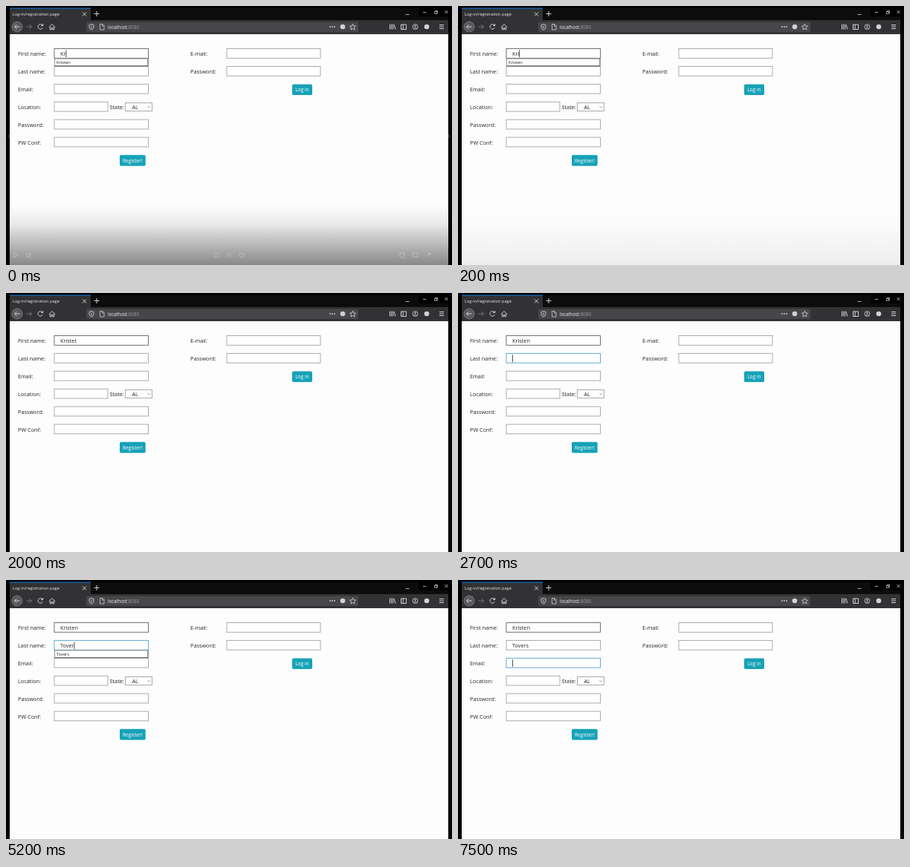
Animation of 600 by 349 pixels, one loop 8000 ms. Source, as an HTML page:

```html
<!DOCTYPE html>
<html lang="en">
<head>
<meta charset="utf-8">
<title>Log-in/registration page</title>
<style>
  html, body { margin: 0; width: 100%; height: 100%; overflow: hidden; background: #000; }
  svg { display: block; width: 600px; height: 349px; }
  text { font-family: "Open Sans", "Noto Sans", sans-serif; font-size: 7.3px; fill: #212529; white-space: pre; }
  .small { font-size: 5.7px; }
  .icon { fill: none; stroke: #d2d2d4; stroke-width: 1; }
  .dim { stroke: #77777a; }
  .field { fill: #fff; stroke: #a2a2a2; stroke-width: .9; }
  .field.edited { stroke: #606060; }
  .field.focus { stroke: #4fa3d1; }
  .button { fill: #17a2b8; }
  .button + text { fill: #fff; font-size: 6.6px; text-anchor: middle; }
</style>
</head>
<body>
<svg viewBox="0 0 600 349">
  <defs>
    <linearGradient id="fade" x1="0" y1="0" x2="0" y2="1">
      <stop offset="0" stop-opacity="0"/>
      <stop offset=".3" stop-opacity=".07"/>
      <stop offset="1" stop-opacity=".46"/>
    </linearGradient>
  </defs>

  <!-- browser window -->
  <rect width="600" height="349" fill="#000"/>
  <rect x="5" y="3" width="590" height="17" fill="#0c0c0d"/>
  <rect x="555" y="2" width="45" height="12" fill="#000"/>
  <rect x="5" y="3" width="109" height="17" fill="#323234"/>
  <rect x="5" y="2.5" width="109" height="1.2" fill="#1470c8"/>
  <rect x="5" y="19" width="590" height="19" fill="#323234"/>
  <rect x="108" y="21.5" width="366" height="13.5" rx="1.5" fill="#474749"/>
  <rect x="5" y="38" width="590" height="311" fill="#fdfdfd"/>
  <text x="9" y="13" style="font-size:5.66px;fill:#f0f0f0">Log-in/registration page</text>
  <text x="137" y="30.6" style="font-size:6.24px;fill:#f4f4f4">localhost<tspan fill="#9b9b9d">:8080</tspan></text>

  <g class="icon">
    <path d="M103 8.5l5 5m0-5l-5 5M118.500 10.500h7m-3.500-3.500v7"/>
    <path d="M537.500 11.500h5M561 8.500h4M590.500 6l4 4m0-4l-4 4" stroke-width=".8"/>
    <path d="M576.500 7.500h3v3h-3zM577.500 7.500v-1h3v3h-1" stroke-width=".7"/>
    <circle cx="15" cy="28" r="7" fill="#59595c" stroke="#88888b" stroke-width=".7"/>
    <path d="M18.500 28h-7m3-3l-3 3l3 3"/>
    <path class="dim" d="M27.500 28h7m-3-3l3 3l-3 3"/>
    <path d="M49 26a3.300 3.300 0 1 0 .3 3.300M49.700 24v2.600h-2.600"/>
    <path d="M58 28.500l4-4l4 4M59.300 27.800v4h1.900v-2.500h1.600v2.500h1.900v-4"/>
    <path d="M115 24.500l3 1v2.500q0 3-3 4.200q-3-1.200-3-4.200v-2.500zM115 26.500v3.600" stroke-width=".9"/>
    <path d="M126.500 24.500h3.500l2 2v5.500h-5.500zM129.500 24.700v2.300h2.300" stroke-width=".8"/>
    <path d="M466.500 24.300l1.200 2.600l2.800.3l-2.100 1.900l.6 2.800l-2.500-1.400l-2.500 1.400l.6-2.800l-2.100-1.900l2.800-.3z" stroke-width=".9"/>
    <path d="M516.500 24.500v7M518.600 24.500v7M520.700 24.500v7M522 25l2 6.500"/>
    <path d="M531.500 25h7v6.500h-7zM534.200 25v6.500"/>
    <circle cx="550.500" cy="28" r="3.500" stroke-width=".8"/>
    <circle cx="550.500" cy="27" r=".9"/>
    <path d="M548.300 30.500q2.200-2 4.400 0M583 25.500h6m-6 2.500h6m-6 2.500h6"/>
  </g>
  <g fill="#d2d2d4">
    <circle cx="436" cy="28" r=".9"/><circle cx="439" cy="28" r=".9"/><circle cx="442" cy="28" r=".9"/>
    <circle cx="453" cy="28" r="3.300"/><circle cx="566" cy="28" r="3.300"/>
  </g>

  <g id="form"></g>
  <rect class="button" x="385" y="105.500" width="27" height="14.500" rx="1.800"/><text x="398.400" y="115.300">Log in</text>
  <rect class="button" x="153" y="200.800" width="34.700" height="14.700" rx="1.800"/><text x="170.400" y="210.800">Register!</text>
  <text x="139.500" y="138.700">State:</text>
  <rect class="field" x="160.500" y="130.500" width="36" height="11"/>
  <text x="169.500" y="138.700">AL</text>
  <path d="M190.300 135.200l1.800 1.800l1.800-1.800" fill="none" stroke="#777" stroke-width=".7"/>

  <text id="first" x="73" y="67.200"></text>
  <text id="last" x="73" y="91.100"></text>
  <text id="mail" x="73" y="115"></text>
  <g id="list">
    <rect id="listBox" x="65.500" y="71" width="125.500" height="9.800" stroke="#777" stroke-width=".8"/>
    <path d="M191 71v9.800h-125.500" fill="none" stroke="#555" stroke-width=".8"/>
    <text id="listText" class="small" x="68" y="77.900"></text>
  </g>
  <rect id="caret" width=".8" height="9.800" fill="#222"/>

  <!-- player controls that fade away -->
  <g id="shade">
    <rect y="268" width="600" height="81" fill="url(#fade)"/>
    <g id="controls" fill="none" stroke="#fff" stroke-opacity=".28">
      <path d="M11 333v6l5-3zM28 334.500h2l2.500-2v7l-2.500-2h-2zM298 333v6m4-6v6"/>
      <circle cx="283" cy="336" r="3"/><circle cx="317" cy="336" r="3"/>
      <path d="M530 333h6v6h-6zM547 333h7v5h-7zM565 338l6-5m-3 0h3v3"/>
      <path d="M5.500 173l-2.500 2.500l2.500 2.500M594.500 173l2.500 2.500l-2.500 2.500" stroke-opacity=".4"/>
    </g>
  </g>
</svg>
<script>
  const LOOP = 8000, ROW = 23.9;
  const FIRST = "Kristen", LAST = "Tovers";
  const $ = id => document.getElementById(id);

  const label = (x, row, text) =>
    `<text x="${x}" y="${67.2 + row * ROW}">${text}</text>`;
  const field = (x, row, width = 126.5) =>
    `<rect class="field" x="${x}" y="${57.5 + row * ROW}" width="${width}" height="12.8"/>`;

  $("form").innerHTML =
    ["First name:", "Last name:", "Email:", "Location:", "Password:", "PW Conf:"]
      .map((text, row) => label(16, row, text) + field(65, row, row === 3 ? 72 : 126.5)).join("") +
    ["E-mail:", "Password:"]
      .map((text, row) => label(248, row, text) + field(297, row, 126)).join("");

  const inputs = document.querySelectorAll("#form .field");
  const values = [$("first"), $("last"), $("mail")];

  // time, focused row, typed text, caret shown, list: 0 closed, 1 open, 2 item picked
  const steps = [
    [0, 0, "Kr", 1, 1],
    [100, 0, "Kri", 1, 1],
    [300, 0, "Kris", 1, 1],
    [1000, 0, "Kris", 0, 1],
    [1200, 0, "Krist", 1, 1],
    [1300, 0, "Kriste", 1, 1],
    [1500, 0, "Kristet", 1, 1],
    [1600, 0, "Kristet", 1, 0],
    [2000, 0, "Kristet", 0, 0],
    [2200, 0, "Kriste", 1, 1],
    [2500, 0, FIRST, 1, 1],
    [2600, 1, "", 1, 0],
    [3200, 1, "T", 1, 1],
    [3600, 1, "To", 1, 1],
    [4000, 1, "Tor", 1, 1],
    [4100, 1, "Tor", 1, 0],
    [4300, 1, "To", 1, 1],
    [4800, 1, "Tov", 1, 1],
    [5000, 1, "Tove", 1, 1],
    [5200, 1, "Tover", 1, 1],
    [5500, 1, "Tover", 0, 1],
    [5900, 1, "Tover", 1, 1],
    [6200, 1, "Tover", 0, 2],
    [6400, 1, LAST, 1, 0],
    [6600, 2, "", 1, 0],
    [7000, 2, "", 0, 0],
    [7500, 2, "", 1, 0]
  ];
  const shades = [1, .43, .13, .04];
  let shown = null;

  function show(step) {
    const [, row, typed, caret, list] = step;
    [FIRST, LAST, ""].forEach((full, i) => {
      values[i].textContent = i < row ? full : i === row ? typed : "";
      inputs[i].setAttribute("class", "field" + (i === 0 ? " edited" : i === row ? " focus" : ""));
    });
    const width = typed ? values[row].getComputedTextLength() : 0;
    $("caret").setAttribute("x", 73 + width);
    $("caret").setAttribute("y", 59.4 + row * ROW);
    $("caret").style.opacity = caret;
    $("list").style.display = list ? "" : "none";
    $("list").setAttribute("transform", `translate(0 ${row * ROW})`);
    $("listBox").style.fill = list === 2 ? "#0078d7" : "#fff";
    $("listText").style.fill = list === 2 ? "#fff" : "#222";
    $("listText").textContent = row ? LAST : FIRST;
  }

  function draw() {
    const t = performance.now() % LOOP;
    const step = steps.findLast(s => s[0] <= t);
    if (step !== shown) show(shown = step);
    $("shade").style.opacity = shades[Math.floor(t / 100)] || 0;
    $("controls").style.display = t < 100 ? "" : "none";
    requestAnimationFrame(draw);
  }
  draw();
</script>
</body>
</html>
```
